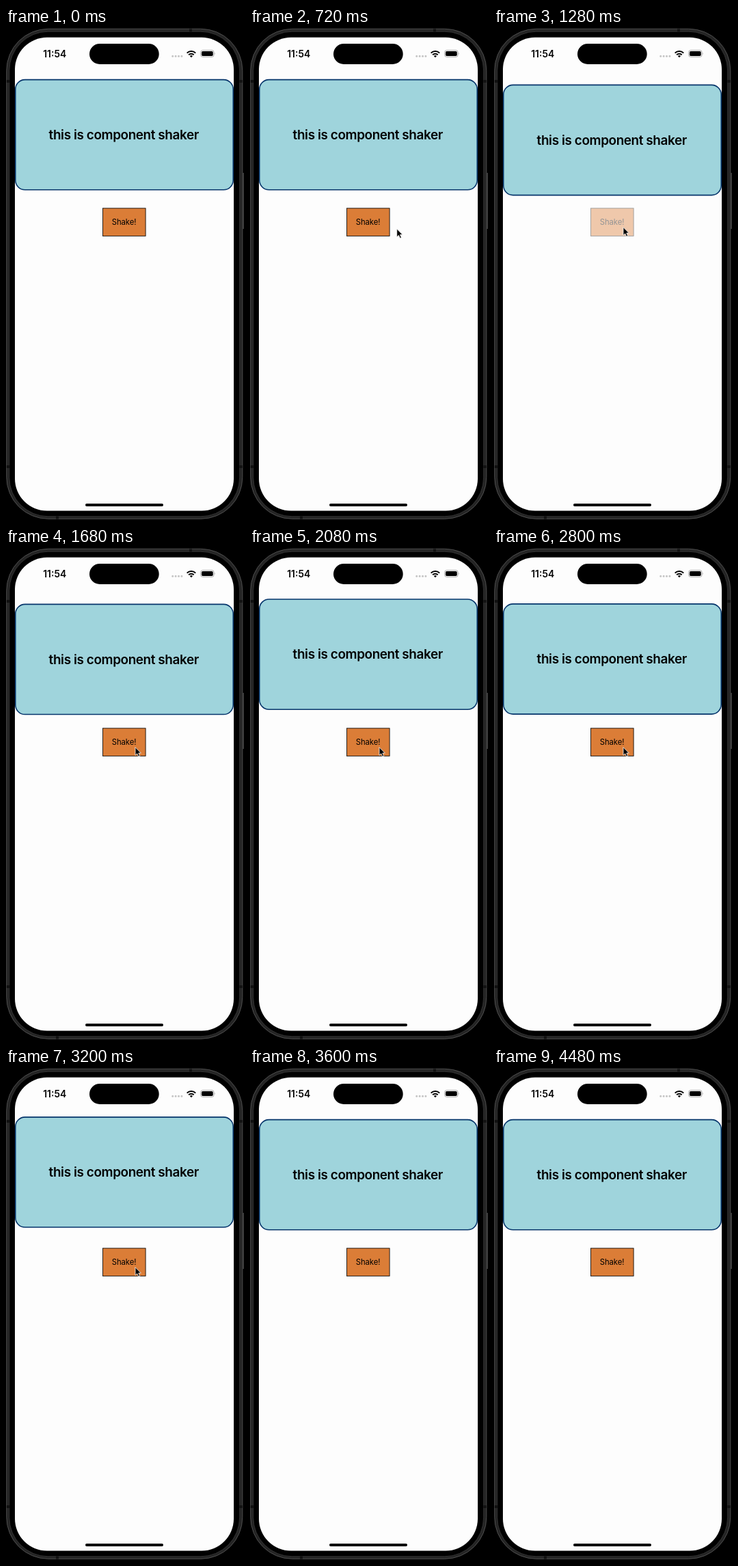
An HTML page that plays this animation: 348x720 px, repeating every 4560 ms.

```html
<!DOCTYPE html>
<html lang="en">
<head>
<meta charset="utf-8">
<title>Component shaker</title>
<style>
  html, body { margin: 0; width: 100%; height: 100%; overflow: hidden; background: #000; }
  svg { display: block; width: 348px; height: 720px; font-family: Inter, "Liberation Sans", sans-serif; }
  text { text-anchor: middle; }
</style>
</head>
<body>
<svg viewBox="0 0 348 720">
  <!-- phone body -->
  <rect x="0.8" y="1.3" width="345" height="717" rx="61" fill="#242424" stroke="#555" stroke-width="0.9"/>
  <rect x="4.8" y="5.2" width="336.8" height="709.6" rx="57" stroke="#3c3c3c" stroke-width="0.8"/>
  <path d="M270 1.5v4M75 714.5v4M1 78h4M1 642h4M341.5 78h4M341.5 642h4" stroke="#111" stroke-width="4"/>
  <rect x="345.6" y="212" width="2.4" height="82" fill="#3a3a3a"/>
  <rect x="13" y="13.8" width="320" height="692.8" rx="47" fill="#fdfdfd"/>

  <!-- status bar -->
  <text x="71.2" y="42.8" font-size="13.9" font-weight="600">11:54</text>
  <rect x="122" y="23" width="101.7" height="30" rx="15"/>
  <path d="M243.7 41.2h14" stroke="#c4c4c4" stroke-width="3" stroke-linecap="round" stroke-dasharray="0 4.4"/>
  <g fill="none" stroke="#000" stroke-width="2">
    <path d="M264.6 36.6a9 9 0 0 1 12.6 0M267.1 39.2a5.4 5.4 0 0 1 7.6 0"/>
  </g>
  <path d="M270.9 43.2l-2.1-2.2a3 3 0 0 1 4.2 0z"/>
  <rect x="284.5" y="32.6" width="19.6" height="9.8" rx="3" fill="none" stroke="#a5a5a5" stroke-width="0.9"/>
  <rect x="285.9" y="34" width="16.8" height="7" rx="1.8"/>
  <path d="M305.2 35.9q1.3 1.6 0 3.2z" fill="#a5a5a5"/>

  <g id="card">
    <rect x="13.8" y="75.6" width="318.4" height="161.2" rx="14" fill="#9fd4dc" stroke="#06356b" stroke-width="1.6"/>
    <text x="172.2" y="163" font-size="18.9" font-weight="600" letter-spacing="-0.4">this is component shaker</text>
  </g>

  <g id="button">
    <rect x="141.5" y="263.8" width="62.6" height="40.6" fill="#db7d37" stroke="#111" stroke-width="0.9"/>
    <text x="172.6" y="288.2" font-size="11.3" letter-spacing="-0.1">Shake!</text>
  </g>

  <rect x="116" y="696" width="114" height="4" rx="2"/>
  <path id="cursor" d="M0 0V11.8L2.7 9.3 4.7 13.6 6.7 12.7 4.8 8.5H8.4Z" stroke="#fff" stroke-width="0.8"/>
</svg>
<script>
const LOOP = 4560, STEP = 80;
const TAPS = [1160, 2512];
const FIRST = 222, SWING = 181, AMPLITUDE = 13.5;
const POSES = [0, 1, -1, 1, -1, 0];
const [card, button, cursor] = ["card", "button", "cursor"].map(id => document.getElementById(id));

const clamp = x => Math.min(1, Math.max(0, x));
const mix = (a, b, k) => a + (b - a) * k;
const easeInOut = x => x < 0.5 ? 2 * x * x : 1 - 2 * (1 - x) ** 2;

// Offset of the card, t ms after a tap: one slower lead-in, then equal swings.
function shake(t) {
  const phase = t < FIRST ? t / FIRST : 1 + (t - FIRST) / SWING;
  if (phase <= 0 || phase >= 5) return 0;
  const i = Math.floor(phase);
  return AMPLITUDE * mix(POSES[i], POSES[i + 1], easeInOut(phase - i));
}

// Fades out on press, then back in on release.
function pressOpacity(t) {
  return t < 30 ? mix(1, 0.2, easeInOut(clamp((t + 72) / 100)))
                : mix(0.2, 1, easeInOut(clamp((t - 30) / 250)));
}

function cursorAt(t) {
  if (t < 400 || t >= 3520) return null;
  if (t < 3280) {
    const k = 1 - (1 - clamp((t - 400) / 560)) ** 2;
    return [mix(329, 189, k), mix(297, 291.6, k ** 3)];
  }
  const k = ((t - 3280) / 160) ** 1.5;
  return [mix(189, 300, k), mix(291.6, 376, k)];
}

function draw(now) {
  const t = Math.floor(now % LOOP / STEP) * STEP;
  const sinceTap = t - (t < 2300 ? TAPS[0] : TAPS[1]);
  card.setAttribute("transform", `translate(0 ${shake(sinceTap)})`);
  button.setAttribute("opacity", pressOpacity(sinceTap));
  const tip = cursorAt(t);
  cursor.setAttribute("visibility", tip ? "visible" : "hidden");
  if (tip) cursor.setAttribute("transform", `translate(${tip})`);
}

let start;
function tick(now) {
  start ??= now;
  draw(now - start);
  requestAnimationFrame(tick);
}
draw(0);
requestAnimationFrame(tick);
</script>
</body>
</html>
```
